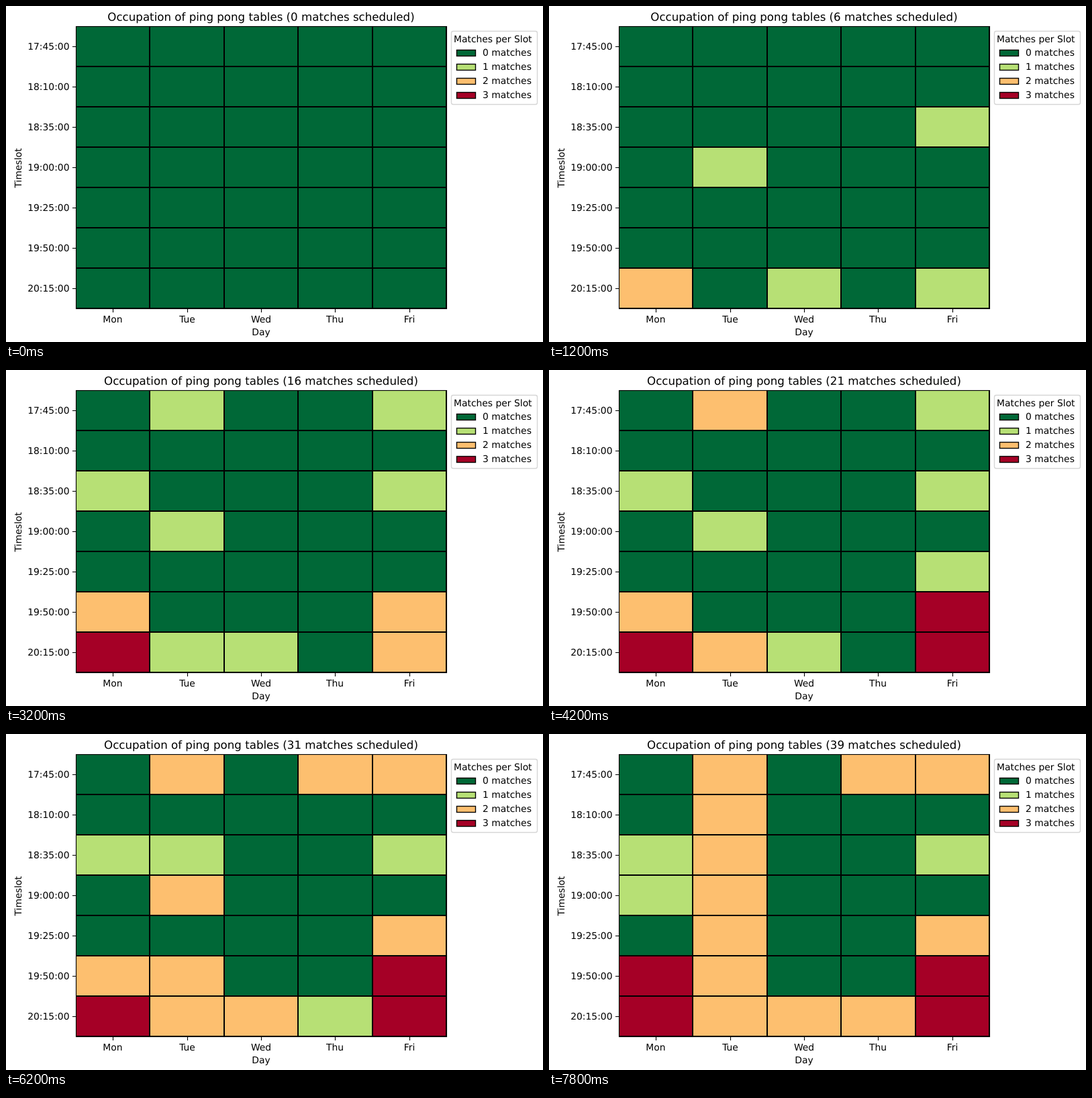
Recreate the animation shown at these times as an HTML page. Size 800 by 500 pixels, loop 8 s.

```html
<!DOCTYPE html>
<html lang="en">
<head>
<meta charset="utf-8">
<title>Table occupation</title>
<style>
  html, body { margin: 0; width: 100%; height: 100%; overflow: hidden; background: #fff; }
  svg { display: block; width: 800px; height: 500px; }
  text { font: 13.89px "DejaVu Sans", sans-serif; text-rendering: geometricPrecision; }
  #title { font-size: 16.67px; }
  .mid { text-anchor: middle; }
  .end { text-anchor: end; }
  .handle { stroke: #000; stroke-width: 1.39; }
  .mesh { stroke: #000; stroke-width: 2; }
  .axis { stroke: #000; stroke-width: 1.11; fill: none; }
</style>
</head>
<body>
<svg id="chart" viewBox="0 0 800 500">
  <clipPath id="plot"><rect x="104" y="30" width="553" height="421"/></clipPath>
  <g id="mesh" clip-path="url(#plot)"></g>
  <rect class="axis" x="104.5" y="30.5" width="552" height="420"/>
  <text id="title" class="mid" x="380" y="22"></text>
  <text class="mid" x="380" y="490">Day</text>
  <text class="mid" transform="translate(23 241) rotate(-90)">Timeslot</text>
  <rect x="663.5" y="37.5" width="128" height="109" rx="2.8" fill="#fff" stroke="#d6d6d6" stroke-width="1.39"/>
  <text x="667" y="54">Matches per Slot</text>
</svg>
<script>
const COLORS = ['#006837', '#b7e075', '#fdbf6f', '#a50026'];
const DAYS = ['Mon', 'Tue', 'Wed', 'Thu', 'Fri'];
const TIMES = ['17:45:00', '18:10:00', '18:35:00', '19:00:00', '19:25:00', '19:50:00', '20:15:00'];
const STEP = 200, LOOP = 8000;

// One match per step: day letter (H = Thu) and timeslot row.
const MATCHES = ('M7 F3 W7 T4 M7 F7 M6 F1 M3 M7 M6 F7 T7 T1 F6 F6 T7 T1 F6 F5 F7 ' +
  'T6 T3 F1 F5 T6 H7 H1 T4 H1 W7 M6 H7 T5 M4 T2 T3 T2 T5').split(' ');

const chart = document.getElementById('chart');
const mesh = document.getElementById('mesh');
const title = document.getElementById('title');

function add(parent, tag, attrs, text = '') {
  const node = document.createElementNS(chart.namespaceURI, tag);
  for (const key in attrs) node.setAttribute(key, attrs[key]);
  node.textContent = text;
  return parent.appendChild(node);
}

const colX = i => Math.round(104 + 110.4 * i);
const rowY = i => 30 + 60 * i;

const cells = {};
DAYS.forEach((day, c) => TIMES.forEach((time, r) => {
  cells['MTWHF'[c] + (r + 1)] = add(mesh, 'rect', {
    x: colX(c), y: rowY(r), width: colX(c + 1) - colX(c), height: 60
  });
}));
for (let c = 0; c <= DAYS.length; c++)
  add(mesh, 'path', { class: 'mesh', d: `M${colX(c)} 29V452` });
for (let r = 0; r <= TIMES.length; r++)
  add(mesh, 'path', { class: 'mesh', d: `M103 ${rowY(r)}H658` });

DAYS.forEach((day, i) => {
  const x = colX(i + 0.5);
  add(chart, 'path', { class: 'axis', d: `M${x + 0.5} 451v5` });
  add(chart, 'text', { class: 'mid', x, y: 471 }, day);
});
TIMES.forEach((time, i) => {
  const y = rowY(i + 0.5);
  add(chart, 'path', { class: 'axis', d: `M99 ${y + 0.5}h5` });
  add(chart, 'text', { class: 'end', x: 94.5, y: y + 5 }, time);
});
COLORS.forEach((fill, i) => {
  add(chart, 'rect', { class: 'handle', x: 671.5, y: 65.5 + 21 * i, width: 28, height: 9, fill });
  add(chart, 'text', { x: 710, y: 74 + 21 * i }, `${i} matches`);
});

let shown = -1;
function draw(count) {
  if (count === shown) return;
  shown = count;
  const load = {};
  for (const id of MATCHES.slice(0, count)) load[id] = (load[id] || 0) + 1;
  for (const id in cells) cells[id].setAttribute('fill', COLORS[load[id] || 0]);
  title.textContent = `Occupation of ping pong tables (${count} matches scheduled)`;
}

const start = performance.now();
function tick() {
  draw(Math.floor((performance.now() - start) % LOOP / STEP));
  requestAnimationFrame(tick);
}
tick();
</script>
</body>
</html>
```
